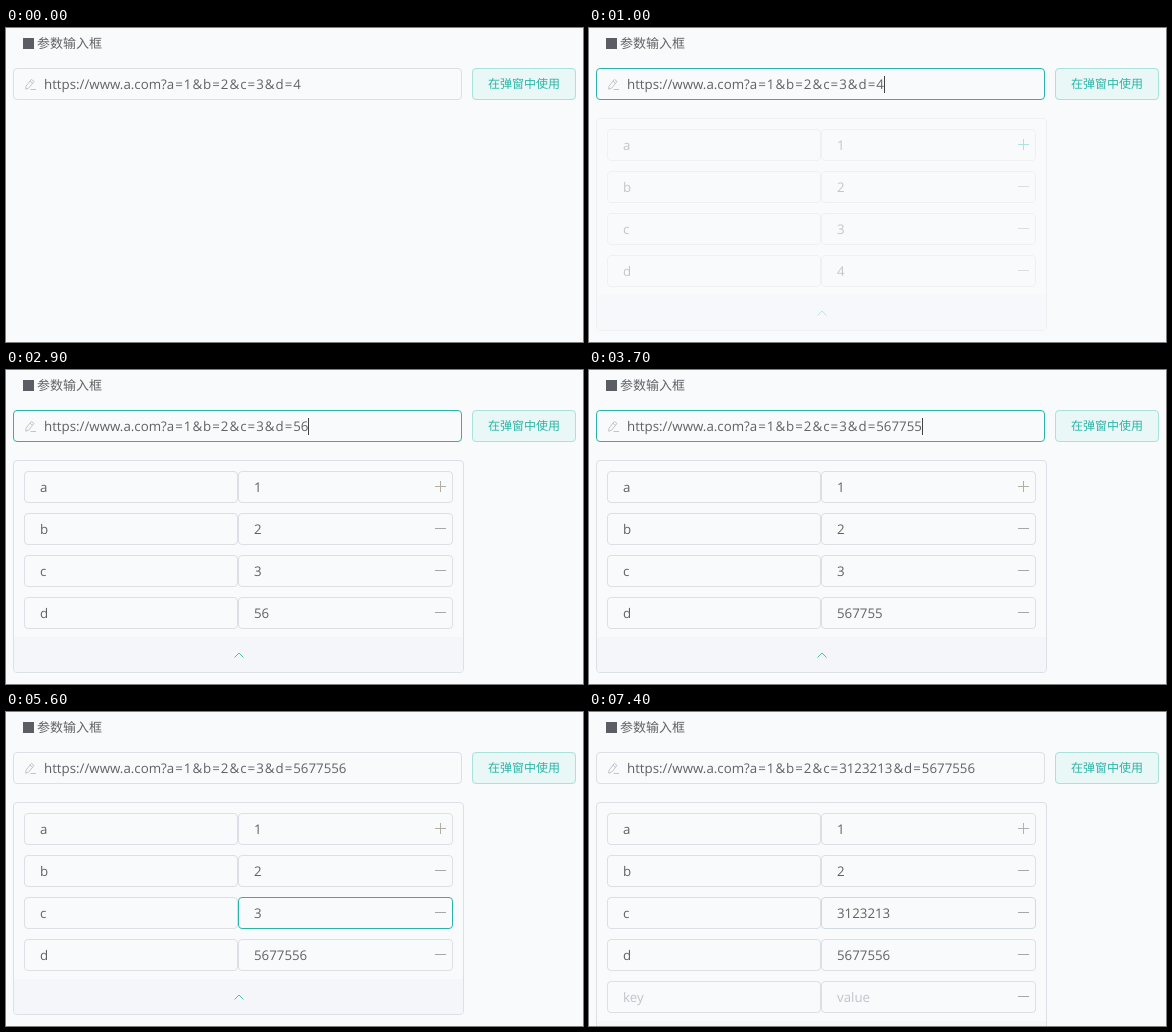
These frames come from a looping animation (577 px wide and 314 px high, 8 s). An HTML page:

```html
<!DOCTYPE html>
<html lang="zh-CN">
<head>
<meta charset="utf-8">
<style>
  html, body { margin: 0; width: 100%; height: 100%; overflow: hidden; background: #f9fafc; }
  body {
    position: relative; color: #606266; text-rendering: geometricPrecision;
    font: 13.3px/30px "Open Sans", "Noto Sans", sans-serif;
  }
  div, svg { position: absolute; box-sizing: border-box; white-space: nowrap; }
  svg { fill: none; }
  .zh { font-family: "Noto Sans CJK SC", "Noto Sans CJK", sans-serif; }
  .box { height: 32px; border: 1px solid #dcdfe6; border-radius: 4px; padding-left: 15px; }
  .mark { left: 17px; top: 10px; width: 11px; height: 11px; background: #5b5d64; }
  .title { left: 31px; top: 0; font-size: 13px; }
  #url { left: 7px; top: 40px; width: 449px; padding-left: 30px; }
  #url b { font-weight: 400; padding: 0 1px; }
  .button {
    left: 466px; top: 40px; width: 104px; padding: 0; text-align: center; font-size: 12px;
    color: #2bb5a8; background: #e9f7f6; border-color: #a9e1dc;
  }
  #panel { left: 7px; top: 90px; width: 451px; border: 1px solid #dcdfe6; border-radius: 4px; overflow: hidden; }
  .row { left: 10px; width: 429px; height: 32px; }
  .key { left: 0; width: 214px; }
  .value { left: 214px; width: 215px; }
  .row svg { left: 411px; top: 10px; }
  .footer { left: 0; right: 0; bottom: 0; height: 35px; background: #f4f6fa; }
  .hint { color: #c0c4cc; }
  .caret { display: inline-block; width: 1px; height: 17px; margin-right: -1px; vertical-align: -4px; background: #404246; }
</style>
</head>
<body>
<div class="mark"></div>
<div class="title zh">参数输入框</div>
<div class="box" id="url"></div>
<svg style="left:18px;top:50px" width="13" height="13" stroke="#c0c4cc">
  <path d="M2 8.2 7.4 1.4 10 3.5 4.6 10.2 1.7 11.2ZM6 3.2 8.6 5.3M6.5 11.5H12"/>
</svg>
<div class="box button zh">在弹窗中使用</div>
<div id="panel">
  <div class="footer">
    <svg style="left:219px;top:14px" width="12" height="8" stroke="#4dbdb2"><path d="M1.5 6.5 6 2 10.5 6.5"/></svg>
  </div>
</div>
<script>
const LOOP = 8000, GRAY = '#dcdfe6', HOVER = '#c0c4cc', TEAL = '#2ab4a8';
const byId = id => document.getElementById(id);
const url = byId('url'), panel = byId('panel');

const rows = ['a', 'b', 'c', 'd', ''].map((key, i) => {
  const row = document.createElement('div');
  row.className = 'row';
  row.style.top = 10 + 42 * i + 'px';
  row.innerHTML = `<div class="box key">${key || hint('key')}</div><div class="box value"></div>
    <svg width="11" height="11" stroke="#a3a8aa"><path d="M0 5.5H11${i ? '' : 'M5.5 0V11'}"/></svg>`;
  panel.append(row);
  return { row, value: row.querySelector('.value'), icon: row.querySelector('svg') };
});

function hint(text) { return `<span class="hint">${text}</span>`; }
const caret = on => on ? '<i class="caret"></i>' : '';
const within = (t, from, to) => t >= from && t < to;
const ramp = (t, from, to) => Math.min(1, Math.max(0, (t - from) / (to - from)));
const mix = (from, to, k) => `color-mix(in srgb, ${to} ${k * 100}%, ${from})`;
// Number of characters typed so far, given the time of each keystroke
const typed = (text, times, t) => text.slice(0, times.filter(at => t >= at).length);

function draw(t) {
  const c = '3' + typed('123213', [6000, 6000, 6100, 6300, 6300, 6400], t);
  const d = t < 2400 ? '4' : typed('5677556', [2600, 2900, 3100, 3400, 3500, 3700, 3800], t);
  const urlCaret = within(t, 900, 1400) || within(t, 1900, 4300) || within(t, 4800, 5100);
  const cCaret = within(t, 5100, 5600) || within(t, 6000, 6900);

  url.innerHTML = `https://www.a.com?a=1&b=2&c=${c}&d=${d}`
    .replace(/[=&]/g, s => `<b>${s === '&' ? '&amp;' : s}</b>`) + caret(urlCaret);
  const urlHover = mix(GRAY, HOVER, ramp(t, 350, 600));
  url.style.borderColor = t < 5000
    ? mix(urlHover, TEAL, ramp(t, 850, 1000))
    : mix(TEAL, GRAY, ramp(t, 5020, 5200));

  panel.style.opacity = ramp(t, 870, 1250);
  panel.style.height = (t < 7300 ? 213 : 255) + 'px';
  rows[4].row.hidden = t < 7300;
  ['1', '2', c, d, ''].forEach((text, i) => {
    rows[i].value.innerHTML = (text || hint('value')) + caret(i === 2 && cCaret);
  });
  rows[0].icon.style.stroke = t < 1100 ? TEAL : t < 6900 ? '#b2aea2' : '#b0b3b6';
  rows[1].value.style.borderColor = within(t, 4700, 4800) ? HOVER : GRAY;
  const cFocus = ramp(t, 5020, 5200) - 0.92 * ramp(t, 7220, 7400);
  rows[2].value.style.borderColor = mix(within(t, 4800, 5200) ? HOVER : GRAY, TEAL, cFocus);
}

function tick() {
  draw(Math.floor(performance.now() % LOOP / 100) * 100);
  requestAnimationFrame(tick);
}
tick();
</script>
</body>
</html>
```
